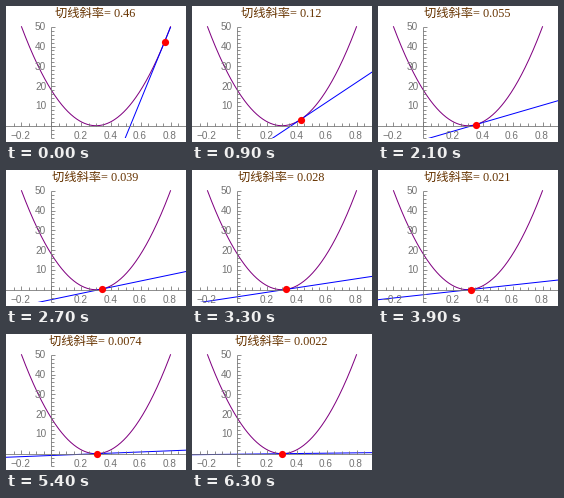
A matplotlib script that plays this animation: 180x136 px, repeating every 6600 ms.

```python
import matplotlib.pyplot as plt
import numpy as np
from matplotlib.animation import FuncAnimation
from matplotlib.patches import Rectangle

W, H, DPI = 180, 136, 64
PX = 72 / DPI                    # points per pixel
X0, Y0 = 45.3, 119.7             # origin on the stage, from the top left
SX, SY = 149, 1.98               # pixels per unit
XMIN, XMAX, YMIN, YMAX = -0.31, 0.91, -6.3, 50
FRAMES, INTERVAL = 22, 300
VERTEX = 0.3
AXIS, LABEL, TITLE = "0.45", "0.45", "#663300"


def parabola(x):
    return 200 * (x - VERTEX) ** 2


def offset(frame):
    """Distance of the touching point from the vertex."""
    return 0.5 * (frame + 1) ** -0.8 - 0.04


fig = plt.figure(figsize=(W / DPI, H / DPI), dpi=DPI, facecolor="white")
ax = fig.add_axes([0, 0, 1, 1])
ax.set_xlim(-X0 / SX, (W - X0) / SX)
ax.set_ylim((Y0 - H) / SY, Y0 / SY)
ax.axis("off")


def draw_axes():
    style = dict(colors=AXIS, linewidth=0.8 * PX, zorder=3)
    ax.hlines(0, XMIN, XMAX, **style)
    ax.vlines(0, YMIN, YMAX, **style)
    for i in range(-5, 18):
        length = 4 if i % 4 == 0 else 2.5
        ax.vlines(i * 0.05, 0, length / SY, **style)
    for value in range(-6, 51, 2):
        length = 4 if value % 10 == 0 else 2.5
        ax.hlines(value, 0, length / SX, **style)

    font = dict(family="Liberation Sans", size=10 * PX, color=LABEL,
                va="baseline", zorder=3)
    for value in (-0.2, 0.2, 0.4, 0.6, 0.8):
        text = f"{value:.1f}".replace("-", "\u2212")
        ax.text(value - 0.7 / SX, (Y0 - 133) / SY, text, ha="center", **font)
    for value in range(10, 51, 10):
        ax.text(-5 / SX, value - 3.5 / SY, str(value), ha="right", **font)


draw_axes()
xs = np.linspace(VERTEX - 0.5, VERTEX + 0.5, 300)
ax.plot(xs, parabola(xs), color="purple", lw=PX, zorder=1)
tangent, = ax.plot([], [], color="blue", lw=PX, zorder=2)
tangent.set_clip_path(Rectangle((XMIN, YMIN), XMAX - XMIN, YMAX - YMIN,
                                transform=ax.transData))
point, = ax.plot([], [], "o", color="red", ms=7.2 * PX, mew=0, zorder=4)
title = ax.text((89 - X0) / SX, (Y0 - 11) / SY, "", ha="center", va="baseline",
                family=["Liberation Serif", "Noto Sans CJK JP"],
                size=12.3 * PX, color=TITLE, zorder=4)


def update(frame):
    d = offset(frame)
    x, y = VERTEX + d, parabola(VERTEX + d)
    ends = np.array([XMIN, XMAX])
    tangent.set_data(ends, y + 400 * d * (ends - x))
    point.set_data([x], [y])
    title.set_text(f"切线斜率= {d:.2g}")
    return tangent, point, title


anim = FuncAnimation(fig, update, frames=FRAMES, interval=INTERVAL,
                     repeat=True, repeat_delay=0)
plt.show()
```
